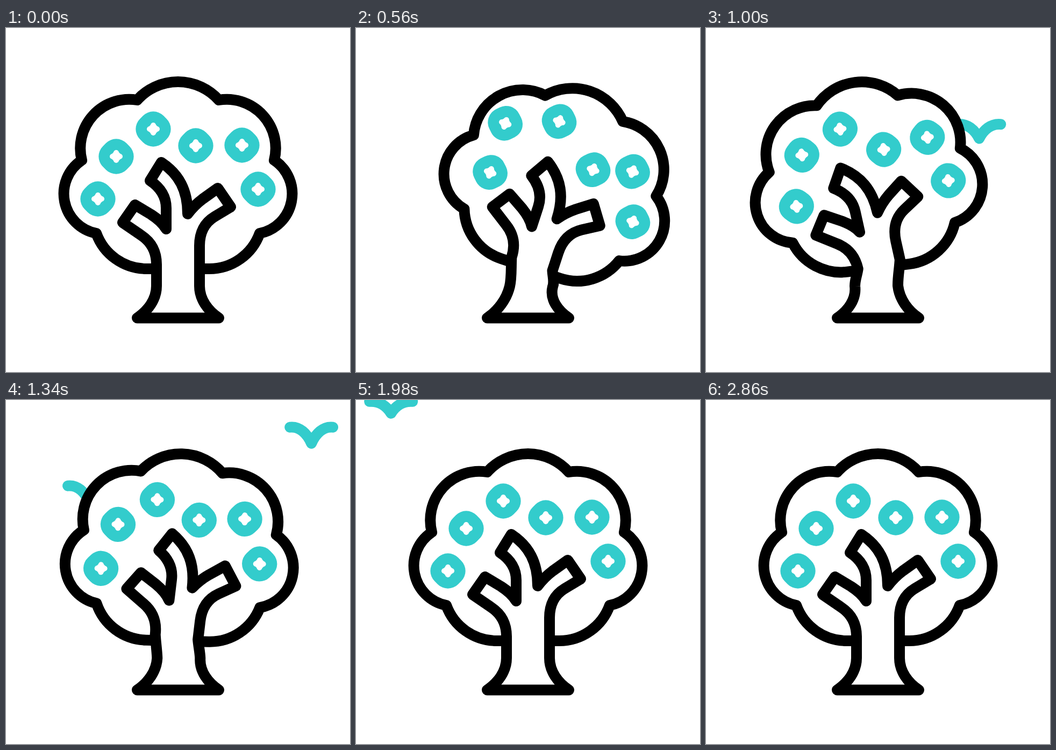
An HTML page that plays this animation: 640x640 px, repeating every 3.6 s.

```html
<!DOCTYPE html>
<html lang="en">
<head>
<meta charset="utf-8">
<title>Swaying tree</title>
<style>
  html, body { margin: 0; width: 100%; height: 100%; overflow: hidden; background: #fff; }
  svg { display: block; width: 100%; height: 100%; }
  .bird, .wood { stroke-width: 20; stroke-linecap: round; stroke-linejoin: round; }
  .bird { fill: none; stroke: #3cc; }
  .wood { fill: #fff; stroke: #000; }
  .hole { fill: #fff; stroke: #fff; stroke-width: 10; stroke-linecap: round; }
</style>
</head>
<body>
<svg viewBox="0 0 640 640">
  <defs>
    <g id="coin">
      <rect x="-31" y="-31" width="62" height="62" rx="27" fill="#3cc" transform="rotate(45)"/>
      <rect x="-9" y="-9" width="18" height="18" rx="4" fill="#fff" transform="rotate(45)"/>
      <path class="hole" d="M-7 0H7M0-7V7"/>
    </g>
  </defs>
  <path class="bird"/>
  <path class="bird"/>
  <path id="crown" class="wood" d="M244 134A102 102 0 0 1 396 134A91 91 0 0 1 499 246A75 75 0 0 1 472 382
    A100 100 0 0 1 378 448H262A100 100 0 0 1 168 382A75 75 0 0 1 141 246A91 91 0 0 1 244 134Z"/>
  <g id="coins"></g>
  <path id="trunk" class="wood"/>
</svg>
<script>
const LOOP = 3600;
const $ = id => document.getElementById(id);
const birds = document.querySelectorAll('.bird');

// Resting place of each coin, and its drift when the trunk bends hard
const COINS = [
  [274, 188, 7, -6], [353, 219, 6, 11], [439, 218, 2, 0],
  [205, 239, -2, -17], [171, 318, 12, -4], [469, 300, 1, 3]
].map(([x, y, dx, dy]) => {
  const el = document.createElementNS('http://www.w3.org/2000/svg', 'use');
  el.setAttribute('href', '#coin');
  $('coins').append(el);
  return { el, x, y, dx, dy };
});

// Eased swing through three alternating peaks, then back to rest
function swing(t, lag, ...peaks) {
  const times = [0, 540 + lag, 1010 + lag, 1420 + lag, 1820 + lag];
  const values = [0, ...peaks, 0];
  const i = times.findIndex(end => end > t);
  if (i < 0) return 0;
  const u = (t - times[i - 1]) / (times[i] - times[i - 1]);
  const ease = (1 - Math.cos(Math.PI * u)) / 2;
  return values[i - 1] + (values[i] - values[i - 1]) * ease;
}

const TRUNK = `M244 539.5 C264 526 280 505 280 480 C280 466 280 453 280 440
  C280 416 270 398 252 386 L217 362 L240 329 L270 347 Q290 360 298 374
  L298 335 C298 312 286 296 268 284 L289 250 C322 272 338 302 338 346
  Q350 330 366 318 L394 298 L418 333 L388 351 C370 362 360 380 360 405
  C360 417 360 428 360 440 C360 453 360 466 360 480 C360 505 376 526 396 539.5 Z`;

// The foot stays fixed; the shift, then the turn, grow up the trunk
function bendTrunk(angle, shift) {
  const drop = 0.4 * Math.max(0, angle);
  return TRUNK.replace(/([\d.]+) ([\d.]+)/g, (_, px, py) => {
    const u = px - 329, v = py - 331;
    const k = Math.min(1, Math.max(0, (495 - py) / 55));
    const w = k * k * (3 - 2 * k);
    const r = angle * w * w * Math.PI / 180, s = Math.sin(r), c = Math.cos(r);
    const x = 329 + u * c - v * s + w * shift;
    const y = 331 + u * s + v * c + w * drop;
    return x.toFixed(2) + ' ' + y.toFixed(2);
  });
}

// Each bird decelerates towards a point just above the stage
function fly(bird, t, start, end, endX, kx, ky) {
  const u = (end - t) ** 2;
  const depth = 26 + 4 * Math.sin((t - 980) / 1360 * 2 * Math.PI);
  bird.style.display = t >= start && t < end ? '' : 'none';
  bird.setAttribute('d', `M-40 ${-depth}C-22 ${-depth * 1.07} -8 ${-depth * 0.6} 0 0`
    + `C8 ${-depth * 0.6} 22 ${-depth * 1.07} 40 ${-depth}`);
  bird.setAttribute('transform', `translate(${endX + kx * u} ${ky * u - 14})`);
}

function draw(t) {
  const crownAngle = swing(t, 15, 18.5, -7.3, 2.7);
  const crownShift = swing(t, -50, 28, -8, 0.5);
  const trunkAngle = swing(t, -15, 18.5, -12.5, 8);
  const trunkShift = swing(t, -40, 43.5, -22.5, 11);

  const sway = `translate(${crownShift} 0) rotate(${crownAngle} 311 382)`;
  $('crown').setAttribute('transform', sway);
  $('trunk').setAttribute('d', bendTrunk(trunkAngle, trunkShift));

  const pull = (trunkAngle / 12.5) ** 2;
  for (const { el, x, y, dx, dy } of COINS) {
    el.setAttribute('transform',
      `translate(${dx * pull} ${dy * pull}) ${sway} translate(${x} ${y})`);
  }
  fly(birds[0], t, 800, 1991, 613.6, -1.075e-4, 2.24e-4);
  fly(birds[1], t, 1060, 2477, 44, 8.6e-5, 1.578e-4);
}

const begin = performance.now();
function tick() {
  draw((performance.now() - begin) % LOOP);
  requestAnimationFrame(tick);
}
tick();
</script>
</body>
</html>
```
